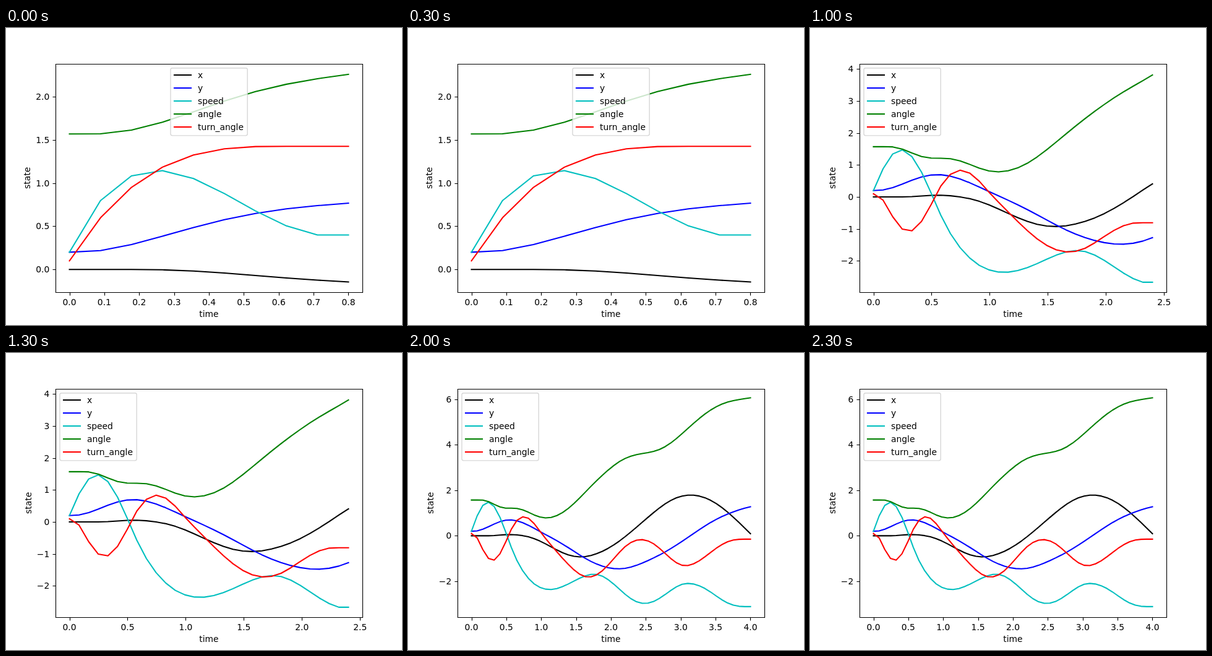
These frames come from a looping animation (640 px wide and 480 px high, 2.5 s). An HTML page:

```html
<!DOCTYPE html>
<html lang="en">
<head>
<meta charset="utf-8">
<title>State over time</title>
<style>
  html, body { margin: 0; width: 100%; height: 100%; overflow: hidden; background: #fff; }
  svg { display: block; width: 640px; height: 480px; }
  text { font: 13.89px "DejaVu Sans", sans-serif; fill: #000; }
  .axis { fill: none; stroke: #000; stroke-width: 1.11; }
  .line { fill: none; stroke-width: 2.083; stroke-linecap: square; stroke-linejoin: round; }
  .box { fill: #fff; fill-opacity: .8; stroke: #ccc; stroke-opacity: .8; stroke-width: 1.39; }
</style>
</head>
<body>
<svg id="stage" viewBox="0 0 640 480"></svg>
<script>
const HOLD = 500;
const LEFT = 80, RIGHT = 576, TOP = 57.6, BOTTOM = 427.2;
const PAD_X = (RIGHT - LEFT) / 22, PAD_Y = (BOTTOM - TOP) / 22;
const SERIES = [
  ['x', '#000000'], ['y', '#0000ff'], ['speed', '#00bfbf'],
  ['angle', '#008000'], ['turn_angle', '#ff0000']
];

// Steering plan: key values every KEY_STEP seconds
const KEY_STEP = 0.2;
const SPEED = [.2, 1.44, .87, -.735, -1.81, -2.29, -2.335, -2.1, -1.8, -1.695, -2.02,
  -2.56, -2.935, -2.9, -2.53, -2.15, -2.13, -2.41, -2.83, -3.08, -3.13];
const TURN = [.1, -.814, -.834, .466, .8, .122, -.616, -1.29, -1.765, -1.705, -1.15,
  -.485, -.175, -.33, -.84, -1.28, -1.21, -.8, -.37, -.165, -.14];

// Each plot keeps the first keys of the plan and ends with its own.
// lo/hi: data range, dx/dy: tick steps, legend: offset from the upper left
const PLOTS = [
  { end: 0.8, lo: -0.145, hi: 2.265, dx: 0.1, dy: 0.5, legend: [179, 0], keep: 1,
    speed: [1.118, .973, .543, .4], turn: [1.02, 1.37, 1.427, 1.445] },
  { end: 1.6, lo: -2.44, hi: 1.572, dx: 0.2, dy: 0.5, legend: [0, 247], keep: 2,
    speed: [.863, -.695, -1.785, -2.303, -2.438, -2.342, -2.255],
    turn: [-.895, .331, .67, .028, -.48, -.627, -.635] },
  { end: 2.4, lo: -2.66, hi: 3.845, dx: 0.5, dy: 1, legend: [0, 0], keep: 8,
    speed: [-1.785, -1.693, -2.02, -2.49, -2.71], turn: [-1.685, -1.64, -1.205, -.845, -.84] },
  { end: 3.2, lo: -2.985, hi: 4.65, dx: 0.5, dy: 1, legend: [0, 0], keep: 14,
    speed: [-2.6, -2.265, -2.14], turn: [-.64, -.8, -.825] },
  { end: 4, lo: -3.125, hi: 6.005, dx: 0.5, dy: 2, legend: [0, 0], keep: 21,
    speed: [], turn: [] }
];

const snap = v => Math.floor(v + 0.5) + 0.5;

function add(parent, tag, attrs, text) {
  const el = document.createElementNS('http://www.w3.org/2000/svg', tag);
  for (const key in attrs) el.setAttribute(key, attrs[key]);
  if (text !== undefined) el.textContent = text;
  return parent.appendChild(el);
}

// Polynomial through the six keys nearest to u
function between(keys, u) {
  const first = Math.max(0, Math.min(Math.floor(u) - 2, keys.length - 6));
  const near = keys.slice(first, first + 6);
  return near.reduce((sum, value, i) =>
    sum + near.reduce((p, _, j) => j === i ? p : p * (u - first - j) / (i - j), value), 0);
}

// Speed and turn drive the vehicle, one Euler step per sample
function simulate({ end, keep, speed, turn }) {
  const n = Math.round(end * 12.5), dt = end / (n - 1);
  const speeds = SPEED.slice(0, keep).concat(speed);
  const turns = TURN.slice(0, keep).concat(turn);
  const rows = [];
  let x = 0, y = 0.2, angle = Math.PI / 2;
  for (let i = 0; i < n; i++) {
    const u = Math.min(i, n - 2) * dt / KEY_STEP;
    const v = between(speeds, u), w = between(turns, u);
    rows.push([x, y, v, angle, w]);
    x += v * Math.cos(angle) * dt;
    y += v * Math.sin(angle) * dt;
    angle += v * w * dt;
  }
  return rows;
}

function ticks(lo, hi, step) {
  const list = [];
  for (let k = Math.ceil(lo / step); k * step <= hi; k++) list.push(k * step);
  return list;
}

const format = (v, step) => v.toFixed(step < 1 ? 1 : 0).replace('-', '\u2212');

function textWidth(text) {
  return [...text].reduce((w, c) => w + 13.89 * (c === '.' ? .318 : c === '\u2212' ? .838 : .636), 0);
}

function drawLegend(g, [dx, dy]) {
  const box = add(g, 'g', { transform: `translate(${dx} ${dy})` });
  add(box, 'rect', { class: 'box', x: 87, y: 64.7, width: 124.2, height: 109.2, rx: 2.8 });
  SERIES.forEach(([name, color], i) => {
    const y = 76 + 21 * i;
    add(box, 'path', { class: 'line', stroke: color, d: `M93 ${y}H120` });
    add(box, 'text', { x: 131, y: y + 5 }, name);
  });
}

function drawPlot(plot) {
  const { end, lo, hi, dx, dy } = plot;
  const g = add(stage, 'g', { visibility: 'hidden' });
  const sx = (RIGHT - LEFT - 2 * PAD_X) / end, sy = (BOTTOM - TOP - 2 * PAD_Y) / (hi - lo);
  const px = t => LEFT + PAD_X + t * sx;
  const py = v => TOP + PAD_Y + (hi - v) * sy;

  const rows = simulate(plot);
  SERIES.forEach(([, color], k) => {
    const points = rows.map((row, i) =>
      px(i * end / (rows.length - 1)).toFixed(2) + ',' + py(row[k]).toFixed(2));
    add(g, 'polyline', { class: 'line', stroke: color, points: points.join(' ') });
  });

  let marks = '', widest = 0;
  for (const t of ticks(0, end + PAD_X / sx, dx)) {
    marks += `M${snap(px(t))} 427.5v5`;
    add(g, 'text', { x: px(t), y: 448, 'text-anchor': 'middle' }, format(t, dx));
  }
  for (const v of ticks(lo - PAD_Y / sy, hi + PAD_Y / sy, dy)) {
    const label = format(v, dy);
    widest = Math.max(widest, textWidth(label));
    marks += `M80.5 ${snap(py(v))}h-5`;
    add(g, 'text', { x: 70.3, y: Math.round(py(v) + 5), 'text-anchor': 'end' }, label);
  }
  add(g, 'path', { class: 'axis', d: marks + 'M80.5 58.5H576.5V427.5H80.5Z' });

  add(g, 'text', { x: 328, y: 467, 'text-anchor': 'middle' }, 'time');
  add(g, 'text', {
    transform: `translate(${Math.round(61.4 - widest)} 242.4) rotate(-90)`, 'text-anchor': 'middle'
  }, 'state');
  drawLegend(g, plot.legend);
  return g;
}

const stage = document.getElementById('stage');
const views = PLOTS.map(drawPlot);

function show(now) {
  const current = Math.floor(now / HOLD) % views.length;
  views.forEach((g, i) => g.setAttribute('visibility', i === current ? 'visible' : 'hidden'));
}

function loop() {
  show(performance.now());
  requestAnimationFrame(loop);
}

show(0);
requestAnimationFrame(loop);
</script>
</body>
</html>
```
